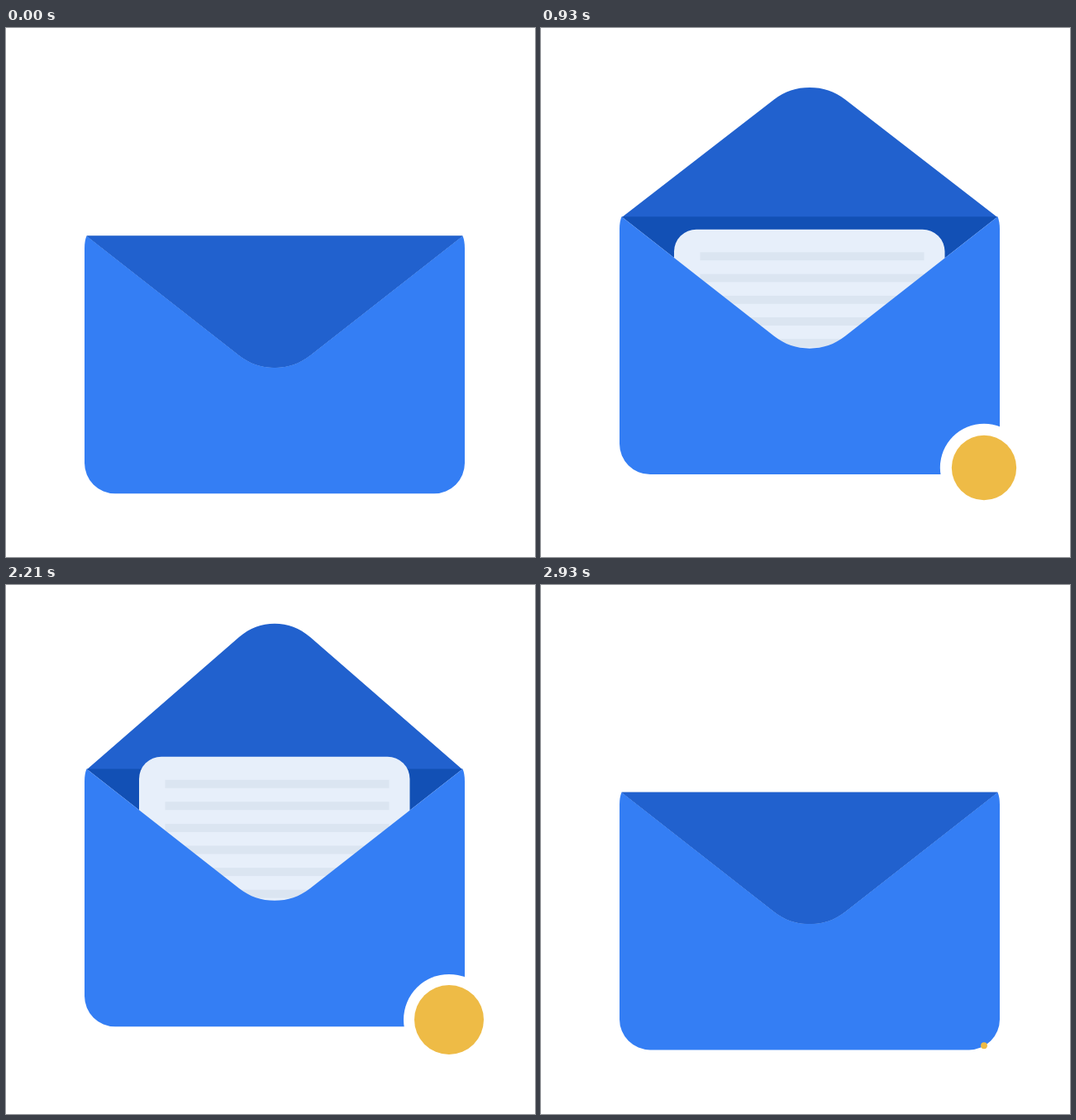
These frames come from a looping animation (640x640 px, 3000 ms). An HTML page with a canvas:

```html
<!DOCTYPE html>
<html lang="en">
<head>
<meta charset="utf-8">
<title>Envelope</title>
<style>
  html, body { margin: 0; height: 100%; overflow: hidden; background: #fff; }
  canvas { display: block; }
</style>
</head>
<body>
<canvas id="stage" width="640" height="640"></canvas>
<script>
const ctx = document.getElementById('stage').getContext('2d');
const LOOP = 3000, STEP = LOOP / 42;
const TOP = 251.6, CX = 325;

// Both shapes are measured down from the top edge of the envelope.
const notch = 'M97.5 0 L282 144.5 C295 154.7 309 159.3 325 159.3 S355 154.7 368 144.5 L552.5 0';
const flap = new Path2D(notch + 'Z');
const front = new Path2D(notch +
  'Q555 6 555 15 V274.7 A37 37 0 0 1 518 311.7 H132 A37 37 0 0 1 95 274.7 V15 Q95 6 97.5 0Z');

const seg = (t, a, b) => Math.min(1, Math.max(0, (t - a) / (b - a)));
const smooth = u => u * u * (3 - 2 * u);
const out = (u, power) => 1 - (1 - u) ** power;

// Height of the envelope above its resting place
function lift(t) {
  return 51 * (smooth(seg(t, 0, 607)) - smooth(seg(t, 607, 1214))
             + smooth(seg(t, 1930, 2450)) - smooth(seg(t, 2450, 2970)));
}

// 1 is shut, -1 is open
function flapScale(t) {
  if (t < 600) return 1 - (t / 600) ** 10.4;
  if (t < 1875) return -out(seg(t, 600, 1227), 6);
  if (t < 2450) return -1 - 0.13 * out(seg(t, 1875, 2430), 2);
  if (t < 2690) return -1.13 * (1 - seg(t, 2450, 2690) ** 3);
  return out(seg(t, 2690, 2930), 3);
}

function fill(color, path) {
  ctx.fillStyle = color;
  ctx.fill(path);
}

function drawFlap(k) {
  ctx.save();
  if (k < 0) ctx.translate(0, 1);
  ctx.scale(1, k);
  fill('#2161ce', flap);
  ctx.restore();
}

function drawLetter(t) {
  const size = out(seg(t, 606, 1233), 6) * (1 - smooth(seg(t, 2450, 2690)));
  if (size <= 0) return;
  const rise = 48 * (smooth(seg(t, 1930, 2450)) - smooth(seg(t, 2450, 2690)));
  ctx.save();
  ctx.translate(0, 226.5 - rise);
  ctx.scale(1, size);
  const sheet = new Path2D();
  sheet.roundRect(161, -214, 327.5, 214, 27);
  fill('#e7effa', sheet);
  ctx.fillStyle = '#dbe5f1';
  for (let i = 0; i < 6; i++) ctx.fillRect(192.5, -186 + i * 26.6, 271, 10);
  ctx.restore();
}

function drawDot(color, radius, size) {
  const dot = new Path2D();
  dot.arc(536, 306.9 - 3.5 * size, radius * size, 0, 2 * Math.PI);
  fill(color, dot);
}

function draw(t) {
  const k = flapScale(t);
  ctx.clearRect(0, 0, 640, 640);
  ctx.save();
  ctx.translate(0, TOP - lift(t));
  if (k < 0) drawFlap(k);
  fill('#1250b5', flap);
  drawLetter(t);
  fill('#347ef4', front);
  if (k > 0) drawFlap(k);
  drawDot('#fff', 55, out(seg(t, 671, 1121), 4) * (1 - smooth(seg(t, 2560, 2925))));
  drawDot('#eebb46', 42, out(seg(t, 708, 1158), 4) * (1 - smooth(seg(t, 2620, 3000))));
  ctx.restore();
}

const start = performance.now();
function tick() {
  const t = (performance.now() - start) % LOOP;
  draw(Math.floor((t + 5) / STEP) % 42 * STEP);
  requestAnimationFrame(tick);
}
tick();
</script>
</body>
</html>
```
